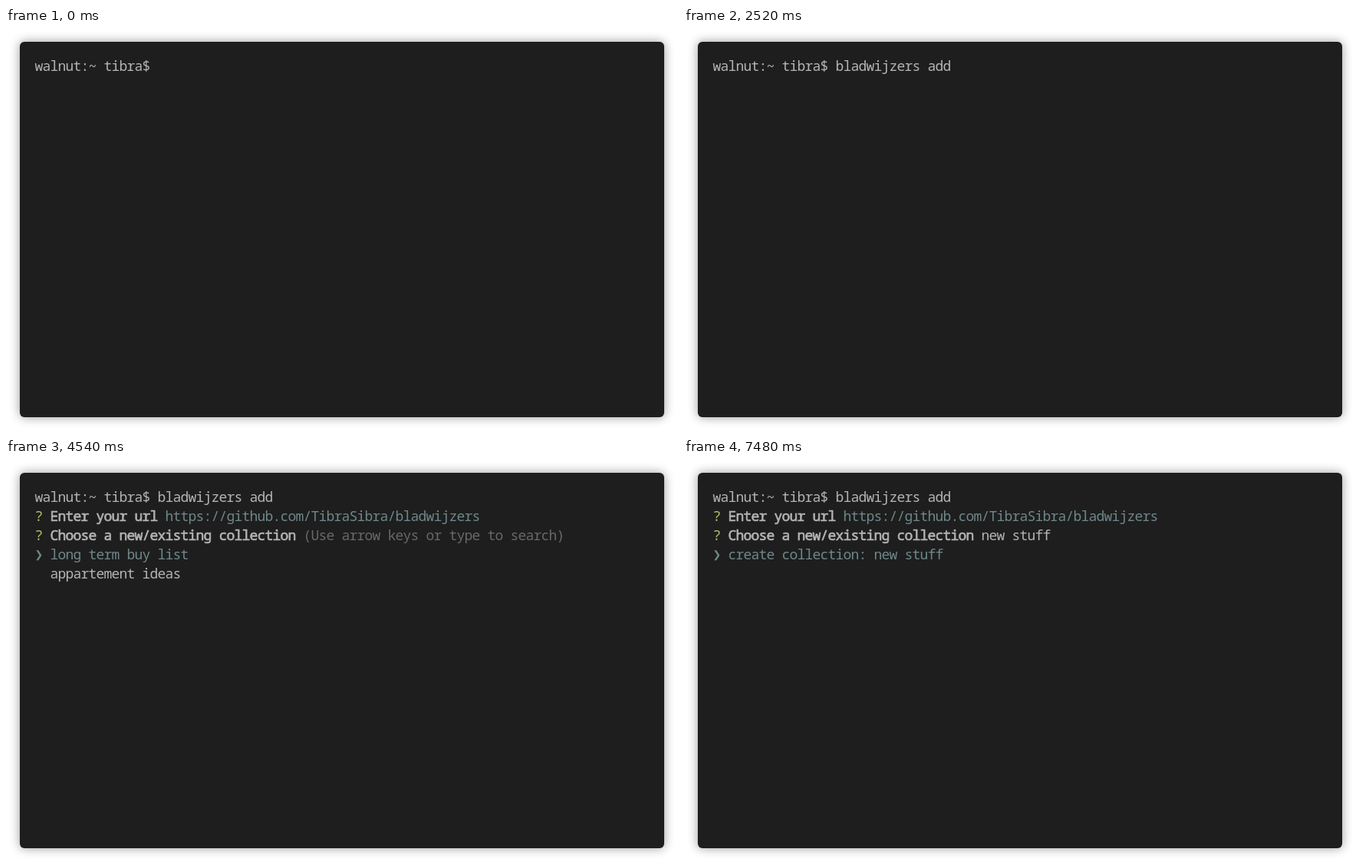
Recreate the animation shown at these times as an HTML page. Size 876 by 526 pixels, loop 8000 ms.

```html
<!DOCTYPE html>
<html lang="en">
<head>
<meta charset="utf-8">
<title>Adding a bookmark in the terminal</title>
<style>
  html, body { margin: 0; width: 100%; height: 100%; overflow: hidden; background: #fff; }
  svg { display: block; }
  text {
    font: 18px "Noto Sans Mono", "DejaVu Sans Mono", monospace;
    letter-spacing: -0.8px;
    white-space: pre;
    fill: #b4b4b4;
  }
  .bold { stroke: #b4b4b4; stroke-width: .65px; }
  .pale { fill: #b0b09a; }
  .mark { fill: #b5bd68; }
  .cyan { fill: #6f8789; }
  .dim { fill: #686868; }
</style>
</head>
<body>
<svg width="876" height="526" viewBox="0 0 876 526">
  <defs>
    <filter id="blur" x="-10%" y="-10%" width="120%" height="120%">
      <feGaussianBlur stdDeviation="7"/>
    </filter>
  </defs>
  <rect width="876" height="526" fill="#fff"/>
  <rect x="18" y="18" width="840" height="490" rx="6" opacity=".4" filter="url(#blur)"/>
  <rect x="18" y="18" width="840" height="490" rx="6" fill="#1e1e1e"/>
  <g id="screen"></g>
</svg>
<script>
const LOOP = 8000, LEFT = 37.6, BASELINE = 56, COLUMN = 10, ROW = 25;
const PROMPT = "walnut:~ tibra$ ";
const COMMAND = "bladwijzers add";
const URL_TEXT = "https://github.com/TibraSibra/bladwijzers";
const COLLECTION = "new stuff";
const CHOICES = ["long term buy list", "appartement ideas"];

// Time at which each character of a typed string appears.
const COMMAND_KEYS = [730, 910, 980, 1050, 1230, 1390, 1500, 1610, 1790, 1840, 2010, 2140, 2270, 2340, 2520];
const COLLECTION_KEYS = [6540, 6670, 6720, 6860, 7000, 7050, 7220, 7310, 7480];
const URL_ASKED = 3410, URL_PASTED = 3990, URL_ACCEPTED = 4510, COLLECTION_ASKED = 4540;

const screen = document.getElementById("screen");
const typed = (text, keys, t) => text.slice(0, keys.filter(key => key <= t).length);

const matches = (choice, query) => {
  let from = 0;
  return [...query].every(char => (from = choice.indexOf(char, from) + 1) > 0);
};

function urlLine(t) {
  const line = [["? ", t < URL_ACCEPTED ? "pale" : "mark"], ["Enter your url ", "bold"]];
  if (t >= URL_PASTED) line.push([URL_TEXT, t < URL_ACCEPTED ? "" : "cyan"]);
  return line;
}

function collectionLines(t) {
  const query = typed(COLLECTION, COLLECTION_KEYS, t);
  const answer = query ? [query, ""] : ["(Use arrow keys or type to search)", "dim"];
  const options = CHOICES.filter(choice => matches(choice, query));
  if (query) options.push("create collection: " + query);
  return [
    [["? ", "mark"], ["Choose a new/existing collection ", "bold"], answer],
    ...options.map((option, i) => i ? [["  " + option, ""]] : [["❯ ", "cyan"], [option, "cyan"]])
  ];
}

function terminalLines(t) {
  const lines = [[[PROMPT + typed(COMMAND, COMMAND_KEYS, t), ""]]];
  if (t >= URL_ASKED) lines.push(urlLine(t));
  if (t >= COLLECTION_ASKED) lines.push(...collectionLines(t));
  return lines;
}

function renderLine(spans, row) {
  let column = 0;
  return spans.map(([text, style]) => {
    const x = LEFT + column * COLUMN;
    column += text.length;
    return `<text x="${x}" y="${BASELINE + row * ROW}" class="${style}">${text}</text>`;
  }).join("");
}

let shown = null;
function render(t) {
  const markup = terminalLines(t).map(renderLine).join("");
  if (markup !== shown) screen.innerHTML = shown = markup;
}

const start = performance.now();
function tick() {
  render((performance.now() - start) % LOOP);
  requestAnimationFrame(tick);
}
tick();
</script>
</body>
</html>
```
